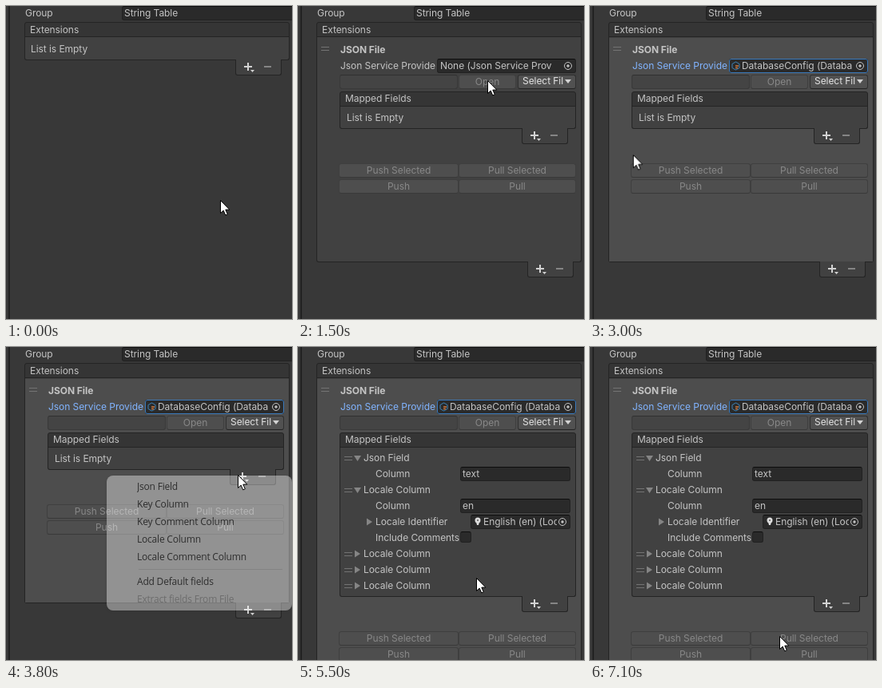
Write an HTML page that moves like this. It is 358 px wide and 392 px high and loops after 7.2 s.

```html
<!DOCTYPE html>
<html lang="en">
<head>
<meta charset="utf-8">
<title>Adding a table extension</title>
<style>
html, body { margin: 0; width: 100%; height: 100%; overflow: hidden; background: #383838; }
#stage { position: relative; width: 358px; height: 392px; overflow: hidden; background: #383838;
  font: 12px/16px Inter, sans-serif; letter-spacing: -.06px; color: #c4c4c4; }
#stage div, #stage svg { position: absolute; box-sizing: border-box; }
#stage svg { overflow: visible; left: 0; top: 0; width: 1px; height: 1px; }
.layer { inset: 0; }
.text { white-space: pre; height: 16px; overflow: hidden; }
.head { background: #353535; border: 1px solid #242424; border-radius: 3px 3px 0 0; }
.body, .foot { background: #414141; border: 1px solid #242424; border-top: 0; border-radius: 0 0 3px 3px; }
.picked { background: #4d4d4d; }
.field { background: #2a2a2a; border: 1px solid #212121; border-top-color: #0d0d0d; border-radius: 3px; }
.off { background: #444; border: 1px solid #393939; border-top-color: #303030; border-radius: 3px; }
.button { background: #515151; border: 1px solid #303030; border-bottom-color: #242424; border-radius: 3px; }
.dim { background: #4e4e4e; border: 1px solid #3f3f3f; border-bottom-color: #393939; border-radius: 3px;
  color: #888; text-align: center; }
.focus { border: 1px solid #3a79bb; border-radius: 3px; }
.menu { background: #f9f9f9; border-radius: 8px; box-shadow: 0 1px 4px #0003; }
.item { font-family: "Open Sans", sans-serif; letter-spacing: -.2px; color: #000; }
.hover { background: #0078d4; border-radius: 4px; }
</style>
</head>
<body>
<div id="stage"></div>
<script>
const LOOP = 7200;
const stage = document.getElementById('stage');

function layer(parent) {
  const el = document.createElement('div');
  el.className = 'layer';
  parent.append(el);
  return el;
}

function box(parent, cls, x, y, w, h, css = '') {
  const el = document.createElement('div');
  el.className = cls;
  el.style.cssText = `left:${x}px;top:${y}px;width:${w}px;height:${h}px;${css}`;
  parent.append(el);
  return el;
}

// Text is placed by its left edge and its vertical centre.
function text(parent, str, x, cy, css = '', cls = '') {
  const el = document.createElement('div');
  el.className = 'text ' + cls;
  el.style.cssText = `left:${x}px;top:${cy - 8}px;${css}`;
  el.textContent = str;
  parent.append(el);
  return el;
}

function icon(parent, x, y, shapes) {
  const el = document.createElement('div');
  el.style.cssText = `left:${x}px;top:${y}px`;
  el.innerHTML = `<svg>${shapes}</svg>`;
  parent.append(el);
  return el;
}

const line = (d, color, width = 1) =>
  `<path d="${d}" fill="none" stroke="${color}" stroke-width="${width}"/>`;
const fill = (d, color) => `<path d="${d}" fill="${color}"/>`;

// rows: [ms, properties, easing]
function play(el, rows) {
  const last = rows[rows.length - 1];
  const frames = [...rows, [LOOP, last[1]]].map(([ms, props, easing = 'step-end']) =>
    ({ offset: ms / LOOP, easing, ...props }));
  el.animate(frames, { duration: LOOP, iterations: Infinity });
}

// Opacity steps as [ms, value] pairs
const fade = (el, ...steps) => play(el, steps.map(([ms, opacity]) => [ms, { opacity }]));

function show(el, from, to = LOOP) {
  const steps = [[0, from ? 0 : 1]];
  if (from) steps.push([from, 1]);
  if (to < LOOP) steps.push([to, 0]);
  fade(el, ...steps);
}

function footer(parent, x, y) {
  box(parent, 'foot', x, y, 58, 20);
  icon(parent, x + 16, y + 9,
    line('M-5 0H5M0-5V5', '#d2d2d2', 2) + fill('M3 4h5l-2.5 3z', '#d2d2d2') +
    line('M20 0h9', '#858585', 2));
}

function handle(parent, x, cy) {
  icon(parent, x, cy, line('M0-1.5H10M0 2.5H10', '#737373'));
}

function picker(parent, x, cy) {
  icon(parent, x, cy, '<circle r="4.5" fill="none" stroke="#c4c4c4"/><circle r="1.7" fill="#c4c4c4"/>');
}

function buttons(parent, y) {
  [['Push Selected', 'Pull Selected'], ['Push', 'Pull']].forEach(([a, b], i) => {
    box(parent, 'dim', 51, y + i * 20, 150, 18).textContent = a;
    box(parent, 'dim', 201, y + i * 20, 147, 18).textContent = b;
  });
}

// Fixed rows
box(stage, '', 3, 0, 2, 392, 'background:#222');
text(stage, 'Group', 24, 9);
box(stage, 'field', 145, 0, 220, 18);
text(stage, 'String Table', 148, 9);

// Empty extension list
const empty = layer(stage);
box(empty, 'body', 23, 38, 332, 30);
text(empty, 'List is Empty', 31, 54);
footer(empty, 287, 67);
show(empty, 0, 1400);

// Extension entry
const ext = layer(stage);
show(ext, 1400);

const short = layer(ext);
box(short, 'body', 23, 38, 332, 283);
footer(short, 287, 320);
show(box(short, 'picked', 24, 40, 330, 280), 2000);
show(short, 0, 5200);

const tall = layer(ext);
box(tall, 'body', 23, 38, 332, 400);
box(tall, 'picked', 24, 40, 330, 380);
show(tall, 5200);

box(stage, 'head', 23, 20, 332, 19);
text(stage, 'Extensions', 30, 30);

handle(ext, 29, 53);
text(ext, 'JSON File', 53, 55, 'font-weight:700');
show(text(ext, 'Json Service Provide', 53, 75), 0, 2000);
show(text(ext, 'Json Service Provide', 53, 75, 'color:#81b4ff'), 2000);

box(ext, 'field', 174, 66, 174, 18);
show(text(ext, 'None (Json Service Prov', 178, 75, 'width:150px'), 0, 2900);
const chosen = layer(ext);
icon(chosen, 178, 70, line('M4.5 0L9 2.5V7.5L4.5 10 0 7.5V2.5Z', '#3f83b5') +
  line('M4 5H8M4 7.5H7', '#d0783c', 1.5));
text(chosen, 'DatabaseConfig (Databa', 190, 75, 'width:140px');
show(chosen, 2900);
picker(ext, 338, 75);
show(box(ext, 'focus', 174, 66, 174, 18), 2000);

box(ext, 'off', 52, 86, 148, 18);
box(ext, 'dim', 201, 86, 72, 18).textContent = 'Open';
box(ext, 'button', 275, 86, 73, 18);
text(ext, 'Select Fil', 281, 94, 'color:#e4e4e4');
icon(ext, 334, 92, fill('M0 0h8l-4 5z', '#d2d2d2'));

// Mapped fields, empty
box(short, 'body', 52, 125, 296, 29);
text(short, 'List is Empty', 61, 140);
footer(short, 280, 153);
buttons(short, 197);

// Mapped fields, filled
box(tall, 'body', 52, 125, 296, 188);
footer(tall, 280, 312);
buttons(tall, 356);

function fold(str, cy, open) {
  handle(tall, 58, cy);
  icon(tall, 70, cy, fill(open ? 'M0-3h9l-4.5 7z' : 'M1-4.5v9l7-4.5z', '#858585'));
  text(tall, str, 82, cy);
}
function column(value, cy) {
  text(tall, 'Column', 97, cy);
  box(tall, 'field', 203, cy - 9, 138, 18);
  text(tall, value, 206, cy);
}
fold('Json Field', 139, true);
column('text', 159);
fold('Locale Column', 179, true);
column('en', 199);
icon(tall, 85, 219, fill('M1-4.5v9l7-4.5z', '#858585'));
text(tall, 'Locale Identifier', 97, 219);
box(tall, 'field', 216, 210, 125, 18);
icon(tall, 224.5, 217, '<circle r="3.5" fill="#ddd"/>' + fill('M-2 2H2L1 6H-1Z', '#ddd') +
  '<circle r="1" fill="#555"/>');
text(tall, 'English (en) (Loc', 232, 219, 'width:92px');
picker(tall, 331, 219);
text(tall, 'Include Comments', 97, 239);
box(tall, 'field', 203, 231, 14, 14);
[259, 279, 299].forEach(cy => fold('Locale Column', cy, false));

box(ext, 'head', 52, 107, 296, 19);
text(ext, 'Mapped Fields', 59, 116);

// Object picker window
const win = layer(stage);
box(win, '', 0, 40, 352, 360, 'background:#333;border-right:1px solid #4a4a4a;border-radius:0 5px 0 0');
box(win, '', 0, 40, 351, 30, 'background:#fff;border-radius:0 5px 0 0');
box(win, '', 331, 47, 20, 19, 'background:#c75050');
icon(win, 341, 56.5, line('M-2.2-2.2L2.2 2.2M2.2-2.2L-2.2 2.2', '#fff', 1.5));
box(win, '', 0, 70, 351, 41, 'background:#3c3c3c;border-bottom:1px solid #242424');
box(win, 'focus', -8, 72, 358, 17, 'background:#282828;border-radius:5px');
box(win, '', 0, 90, 351, 1, 'background:#242424');
icon(win, 251, 102, line('M0 0H55', '#5e5e5e', 2) + '<circle cx="32" r="5" fill="#999"/>');
box(win, '', 310, 91, 41, 19, 'background:#505050;border-left:1px solid #242424');
icon(win, 323, 101, line('M-7 0Q0-8 7 0Q0 8-7 0Z', '#c4c4c4', 1.4) +
  '<circle r="2.3" fill="#c4c4c4"/>' + line('M-5 5.5L6-5.5', '#505050', 4) +
  line('M-5.5 5.5L6-6', '#c4c4c4', 1.5));
text(win, '31', 332, 102);
show(win, 2000, 2900);

// Popup menus
function menu(x, y, h, textX, hoverX) {
  const el = layer(stage);
  box(el, 'menu', x, y, 358 - x, h);
  const item = (str, cy, hover, label = str) => {
    text(el, str, textX, cy, '', 'item');
    if (!hover) return;
    const lit = layer(el);
    box(lit, 'hover', hoverX, cy - 7, 349 - hoverX, 15);
    text(lit, label, textX, cy, 'color:#e8f3fc', 'item');
    show(lit, ...hover);
  };
  return { el, item };
}

const add = menu(134, 78, 72, 172, 144);
add.item('Json Extension', 92, [1000, 1300]);
add.item('Mervol Tables Extension', 114);
add.item('Csv Extension', 136);
box(add.el, '', 168, 144, 180, 1, 'background:#efefef');
fade(add.el, [0, 0], [600, .4], [700, .8], [800, 1], [1300, 0]);

const fields = menu(126, 161, 169, 164, 137);
fields.item('Json Field', 175);
fields.item('Key Column', 197, [4300, 4400]);
fields.item('Key Comment Column', 219);
fields.item('Locale Column', 241, [4400, 4500]);
fields.item('Locale Comment Column', 263);
box(fields.el, '', 166, 278, 180, 1, 'background:#d4d4d4');
fields.item('Add Default fields', 294, [4500, 5100], '');
text(fields.el, 'Extract fields From File', 164, 316, 'color:#9c9c9c', 'item');
fade(fields.el, [0, 0], [3800, .4], [3900, .8], [4000, 1], [5100, 0]);

// Pointer: [ms, x, y], moved in 100 ms steps, out of sight while the window is open
const path = [
  [0, 268, 243], [100, 268, 243], [500, 304, 75], [900, 304, 77], [1100, 237, 93],
  [1600, 237, 93], [1900, 336, 73], [2900, 20, 190], [3700, 290, 160], [4200, 290, 160],
  [4500, 222, 286], [5200, 222, 286], [5400, 223, 289], [6600, 223, 289], [7000, 237, 362]
];
const pointer = icon(stage, 0, 0,
  '<path d="M.5 .5V16.5L4.2 13.1 6.7 18.9 9.3 17.8 6.8 12.1H11.8Z" fill="#fff" stroke="#000"/>');
play(pointer, path.map(([ms, x, y], i) => {
  const next = path[i + 1] ? path[i + 1][0] : LOOP;
  return [ms, { transform: `translate(${x}px, ${y}px)` }, `steps(${(next - ms) / 100}, end)`];
}));
fade(pointer.firstChild, [0, 1], [2000, 0], [2900, 1]);
</script>
</body>
</html>
```
